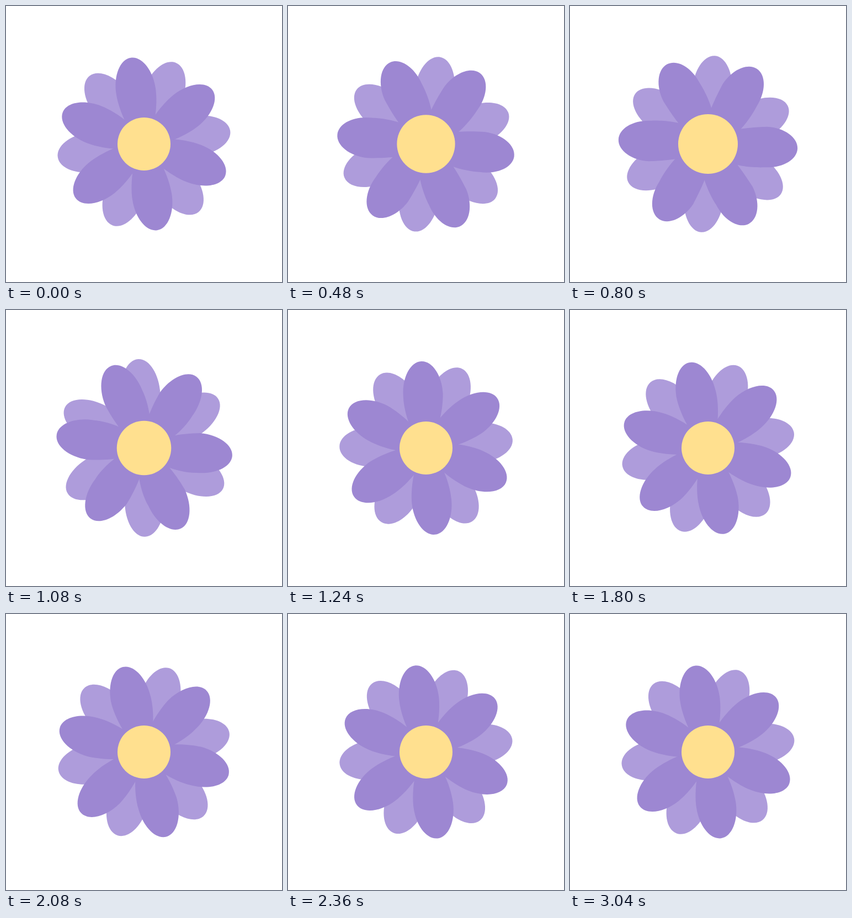
An HTML page that plays this animation: 500x500 px, repeating every 3.32 s.

```html
<!DOCTYPE html>
<html lang="en">
<head>
<meta charset="utf-8">
<title>Swaying flower</title>
<style>
  html, body { margin: 0; width: 100%; height: 100%; overflow: hidden; background: #fff; }
  svg { display: block; width: 100vw; height: 100vh; }
</style>
</head>
<body>
<svg viewBox="-250 -250 500 500">
  <g id="back" fill="#ae9cdb"></g>
  <g id="front" fill="#9d87d2"></g>
  <circle id="heart" r="48" fill="#ffe08f"/>
</svg>
<script>
const LOOP = 3320, STEP = 40, REST = -8.7;
const PERIOD = 1100, LAG = 22;

// Smooth 0 to 1 between two times.
function ramp(t, from, to) {
  const u = Math.min(1, Math.max(0, (t - from) / (to - from)));
  return u * u * (3 - 2 * u);
}

const windUp = t => ramp(t, 120, 640);
const puffAt = t => windUp(t) * (1 - ramp(t, 800, 1200));

// Degrees away from rest: wind back, let go, then ring out like a spring.
function swing(t, { wind, size, decay, peak }) {
  const dt = t - peak;
  const spring = size * Math.exp(-decay * dt) * Math.cos(2 * Math.PI * dt / PERIOD);
  const free = ramp(t, 900, 1240);
  const held = -wind * windUp(t) * (1 - free);
  return held + spring * free * (1 - ramp(t, 1560, 3040));
}

// Petal pointing up from the origin; a swing leans its base and changes its length.
function petalPath(puff, bend) {
  const w = 36 + 0.8 * puff, mid = 97 + 8 * puff;
  const tip = 158 + 2 * puff - 0.13 * bend, lean = -0.2 * bend;
  const x1 = 22 + 7 * puff, y1 = 14 - 6 * puff;
  const cx = w * 0.552, cy = mid + (tip - mid) * 0.552;
  return `M0 0C${x1 + lean} ${-y1} ${w + lean} -66 ${w} ${-mid}`
    + `C${w} ${-cy} ${cx} ${-tip} 0 ${-tip}`
    + `C${-cx} ${-tip} ${-w} ${-cy} ${-w} ${-mid}`
    + `C${-w + lean} -66 ${-x1 + lean} ${-y1} 0 0Z`;
}

// Six petals; those nearest the lead angle move slightly ahead of the rest.
function makeRing(id, offset, lead, motion) {
  const group = document.getElementById(id);
  const petals = Array.from({ length: 6 }, (_, i) => {
    const node = document.createElementNS("http://www.w3.org/2000/svg", "path");
    group.append(node);
    const angle = offset + 60 * i;
    return { node, angle, ahead: LAG * Math.cos((angle - lead) * Math.PI / 180) };
  });
  return (t, puff) => petals.forEach(({ node, angle, ahead }) => {
    const turn = swing(t + ahead, motion);
    node.setAttribute("d", petalPath(puff, turn));
    node.setAttribute("transform", `rotate(${angle + REST + turn})`);
  });
}

const poseBack = makeRing("back", 30, -120, { wind: 16.8, size: 20.5, decay: 0.002, peak: 1480 });
const poseFront = makeRing("front", 0, -45, { wind: 18.3, size: 13.8, decay: 0.0008, peak: 1470 });
const heart = document.getElementById("heart");

function draw(t) {
  const puff = puffAt(t);
  poseBack(t, 0);
  poseFront(t, puff);
  heart.setAttribute("r", 48 + 6 * puff);
}

const start = performance.now();
function tick(now) {
  const t = Math.max(0, now - start) % LOOP;
  draw(Math.floor(t / STEP) * STEP);
  requestAnimationFrame(tick);
}
draw(0);
requestAnimationFrame(tick);
</script>
</body>
</html>
```
